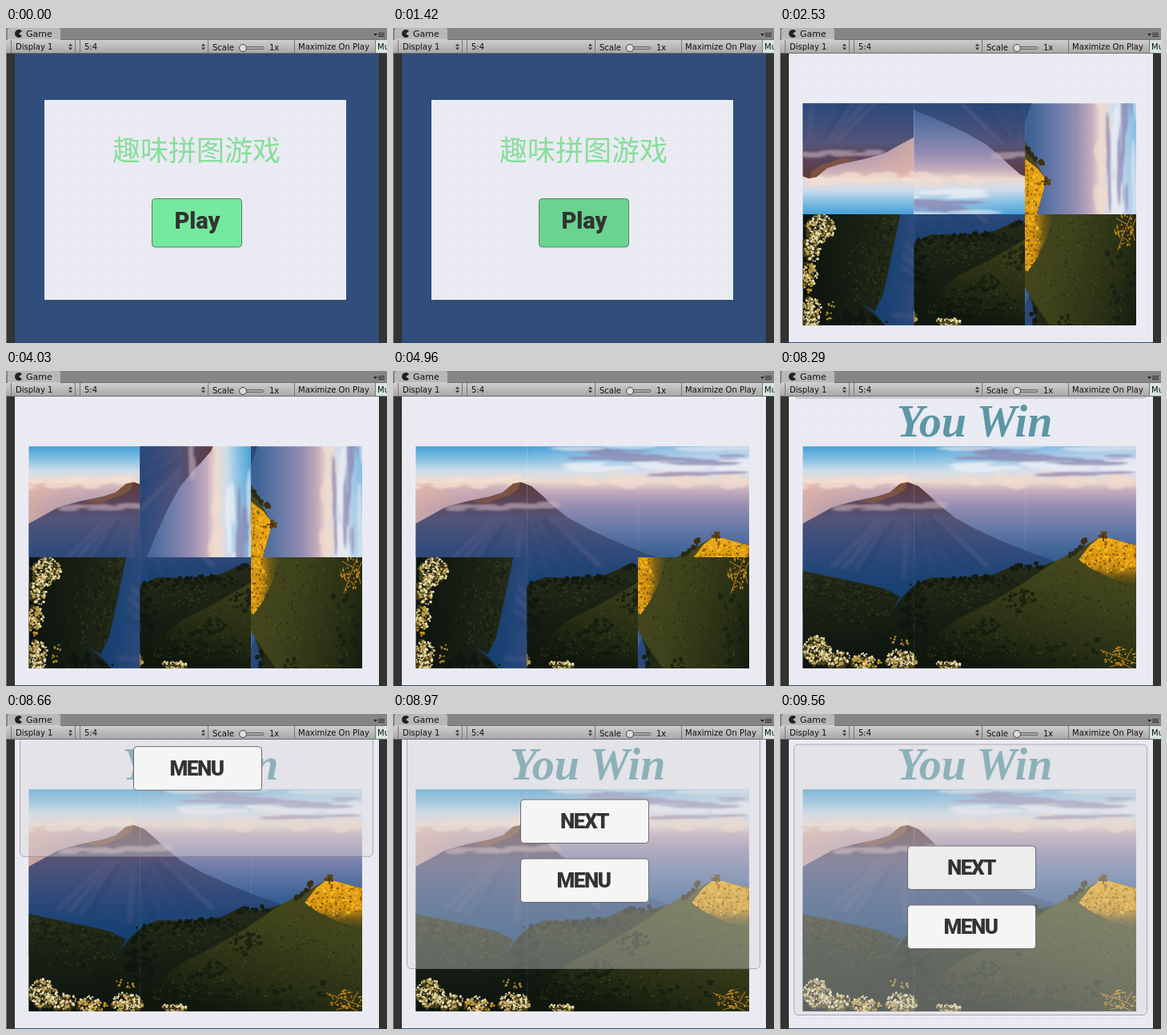
Recreate the animation shown at these times as an HTML page. Size 476 by 394 pixels, loop 9.89 s.

```html
<!DOCTYPE html>
<html lang="zh">
<head>
<meta charset="utf-8">
<title>Puzzle game</title>
<style>
html, body { margin: 0; width: 100%; height: 100%; overflow: hidden; background: #333; }
svg { display: block; width: 476px; height: 394px; }
.ui { font: 10px "DejaVu Sans", sans-serif; fill: #111; }
.label { font: 900 26px Roboto, sans-serif; letter-spacing: -1.5px; fill: #333; text-anchor: middle; }
</style>
</head>
<body>
<svg viewBox="0 0 476 394">
<defs>
  <linearGradient id="sky" x2="0" y2="1">
    <stop offset="0" stop-color="#469fd6"/><stop offset=".06" stop-color="#86c0e3"/>
    <stop offset=".11" stop-color="#cddcea"/><stop offset=".16" stop-color="#ecd9d0"/>
    <stop offset=".2" stop-color="#c5adbd"/><stop offset=".27" stop-color="#958db2"/>
    <stop offset=".36" stop-color="#6b7ba8"/><stop offset=".46" stop-color="#436699"/>
    <stop offset=".55" stop-color="#2a568c"/><stop offset="1" stop-color="#164470"/>
  </linearGradient>
  <linearGradient id="dusk">
    <stop offset="0" stop-color="#e6b5a2" stop-opacity=".75"/><stop offset="1" stop-color="#b99bb0" stop-opacity="0"/>
  </linearGradient>
  <linearGradient id="haze">
    <stop offset="0" stop-color="#dfe2f0" stop-opacity="0"/><stop offset="1" stop-color="#dfe2f0" stop-opacity=".7"/>
  </linearGradient>
  <linearGradient id="rock" x2="0" y2="1">
    <stop offset="0" stop-color="#5d3b38"/><stop offset=".14" stop-color="#5a4459"/>
    <stop offset=".28" stop-color="#545478"/><stop offset=".5" stop-color="#354c7c"/>
    <stop offset=".75" stop-color="#1c4375"/><stop offset="1" stop-color="#103a68"/>
  </linearGradient>
  <linearGradient id="grass" x1=".9" x2=".4" y2="1">
    <stop offset="0" stop-color="#4a4a1e"/><stop offset=".4" stop-color="#3d421b"/>
    <stop offset=".75" stop-color="#272e14"/><stop offset="1" stop-color="#10170d"/>
  </linearGradient>
  <linearGradient id="shade" x2="0" y2="1">
    <stop offset="0" stop-color="#272c18"/><stop offset=".45" stop-color="#182013"/><stop offset="1" stop-color="#0d130e"/>
  </linearGradient>
  <linearGradient id="sunlit" x2="0" y2="1">
    <stop offset="0" stop-color="#eaa514"/><stop offset=".6" stop-color="#d08f10"/><stop offset="1" stop-color="#7d5f12" stop-opacity="0"/>
  </linearGradient>
  <linearGradient id="bar" x2="0" y2="1">
    <stop offset="0" stop-color="#d0d0d0"/><stop offset="1" stop-color="#a6a6a6"/>
  </linearGradient>
  <pattern id="grid" width="20" height="20" patternUnits="userSpaceOnUse">
    <rect width="20" height="20" fill="#ececf4"/>
    <path d="M0 4.5H20M0 8.5H20M0 12.5H20M0 16.5H20M4.5 0V20M8.5 0V20M12.5 0V20M16.5 0V20" stroke="#e9e9f2"/>
    <path d="M0 .5H20M.5 0V20" stroke="#e5e5ee"/>
  </pattern>
  <filter id="soft" x="-20%" y="-50%" width="140%" height="200%"><feGaussianBlur stdDeviation="2.2 1.2"/></filter>
  <clipPath id="view"><rect x="11" y="32" width="455" height="361"/></clipPath>
  <clipPath id="frame"><rect x="28.5" y="94" width="416.5" height="278"/></clipPath>
  <clipPath id="ground"><path id="knoll" d="M373 236L386 219 398 209 412 209 445 218V268L415 260 390 248Z"/></clipPath>
  <g id="photo" clip-path="url(#frame)">
    <rect x="28" y="94" width="417" height="278" fill="url(#sky)"/>
    <rect x="28" y="140" width="170" height="58" fill="url(#dusk)"/>
    <rect x="170" y="94" width="275" height="36" fill="url(#haze)"/>
    <g id="clouds" filter="url(#soft)"></g>
    <path fill="url(#rock)" d="M28 191L50 179 66 170 92 163 121 157 137 152 150 141 160 139 173 144 188 157 198 167 218 183 245 198 280 214 310 226 350 240V300H28Z"/>
    <path fill="#95603f" opacity=".6" d="M97 163L121 157 137 152 150 141 159 139 156 148 146 155 131 160 118 165Z"/>
    <g id="ridges" filter="url(#soft)"></g>
    <path fill="url(#shade)" d="M28 250L62 257 105 266 130 272 150 282 140 300 120 372H28Z"/>
    <path fill="url(#shade)" d="M60 372L110 322 140 300 154 281 170 266 190 258 235 259 268 254 292 243 306 247 325 244 345 238V372Z"/>
    <path fill="url(#grass)" d="M150 372L185 338 222 310 262 290 300 268 338 242 357 231 379 220 398 209 412 209 445 218V372Z"/>
    <g id="texture"></g>
    <g clip-path="url(#ground)"><use href="#knoll" fill="url(#sunlit)"/><g id="gold"></g></g>
    <g id="plants"></g>
  </g>
</defs>

<rect width="476" height="394" fill="#333"/>
<path d="M.5 31V394" stroke="#777"/><path d="M10.5 32V394M466.5 32V394" stroke="#2a2a2a"/>
<rect x="11" y="32" width="455" height="362" fill="#304e79"/>

<g id="menu">
  <rect x="48" y="90" width="377" height="250" fill="url(#grid)"/>
  <text x="133" y="166" font-family="'Noto Sans CJK SC','Noto Sans CJK',sans-serif" font-size="35" font-weight="500" fill="#88de9a">趣味拼图游戏</text>
  <rect id="play" x="182.5" y="213.5" width="112" height="60.5" rx="4" stroke="#577f65"/>
  <text class="label" x="239" y="251" style="font-size:29px;letter-spacing:0">Play</text>
</g>

<g id="game" clip-path="url(#view)">
  <rect x="11" y="32" width="455" height="361" fill="url(#grid)"/>
  <g id="tiles"></g>
  <text id="win" x="243" y="82" text-anchor="middle" font-family="'Liberation Serif',serif" font-size="56" font-weight="700" font-style="italic" fill="#5c97a5">You Win</text>
  <g id="panel">
    <rect x="17.5" y="38" width="441" height="338.5" rx="5" fill="#d6d6d6" fill-opacity=".4" stroke="#77777f" stroke-opacity=".55"/>
    <rect id="next" x="159.5" y="165" width="160" height="54.5" rx="4" stroke="#6c6c6c"/>
    <text class="label" x="239" y="201">NEXT</text>
    <rect x="159.5" y="239" width="160" height="54.5" rx="4" fill="#f5f5f5" stroke="#6c6c6c"/>
    <text class="label" x="238" y="275">MENU</text>
  </g>
</g>

<g class="ui">
  <rect width="476" height="15" fill="#858585"/>
  <path d="M2 15V3Q2 0 5 0H65Q68 0 68 3V15Z" fill="#b8b8b8"/>
  <path d="M16 7L20 4A5 5 0 1 0 20 10Z" fill="#222"/>
  <text x="25" y="11" font-size="11">Game</text>
  <path d="M459 7H464L461.5 10Z" fill="#222"/><path d="M465 6.5H473M465 8.5H473M465 10.5H473" stroke="#333"/>
  <rect y="14" width="476" height="18" fill="url(#bar)"/>
  <path d="M0 14.5H2M68 14.5H476M0 31.5H476" stroke="#707070"/>
  <rect x="461" y="15" width="15" height="16" fill="#d5e5dc"/>
  <path d="M6.5 15V31M86.5 15V31M92.5 15V31M252.5 15V31M360.5 15V31M461.5 15V31" stroke="#777"/>
  <text x="12" y="27">Display 1</text><text x="98" y="27">5:4</text><text x="258" y="28">Scale</text>
  <text x="329" y="28">1x</text><text x="365" y="27">Maximize On Play</text><text x="464" y="27">Mute</text>
  <path fill="#333" d="M78 22.5H83L80.5 19.5ZM78 24.5H83L80.5 27.5ZM244 22.5H249L246.5 19.5ZM244 24.5H249L246.5 27.5Z"/>
  <rect x="293" y="23.5" width="29" height="3" rx="1.5" fill="#aaa" stroke="#666"/>
  <circle cx="296" cy="25" r="4.5" fill="#ddd" stroke="#444"/>
</g>
</svg>

<script>
const $ = id => document.getElementById(id);
const NS = 'http://www.w3.org/2000/svg';
const LOOP = 9890, TILE = 138.8, LEFT = 28.5, TOP = 94.2;

let seed = 7;
const rnd = (a = 0, b = 1) => {
  seed = (seed * 16807) % 2147483647;
  return a + (b - a) * seed / 2147483647;
};
function add(parent, tag, attrs) {
  const el = document.createElementNS(NS, tag);
  for (const k in attrs) el.setAttribute(k, attrs[k]);
  return parent.appendChild(el);
}
const blob = (x, y, rx, ry) =>
  `M${(x - rx).toFixed(1)} ${y.toFixed(1)}a${rx.toFixed(1)} ${ry.toFixed(1)} 0 1 0 ${(2 * rx).toFixed(1)} 0a${rx.toFixed(1)} ${ry.toFixed(1)} 0 1 0 ${(-2 * rx).toFixed(1)} 0`;

// n blobs in one path; place() gives each centre
function scatter(parent, n, fill, r0, r1, place, flat = 1, opacity = 1) {
  let d = '';
  for (let i = 0; i < n; i++) {
    const [x, y] = place(), r = rnd(r0, r1);
    d += blob(x, y, r, r * flat);
  }
  add(parent, 'path', { d, fill, opacity });
}
const inBox = (x0, y0, x1, y1) => () => [rnd(x0, x1), rnd(y0, y1)];
const inDisc = (cx, cy, rx, ry) => () => {
  const a = rnd(0, 6.283), q = Math.sqrt(rnd());
  return [cx + rx * q * Math.cos(a), cy + ry * q * Math.sin(a)];
};
const line = (x0, y0, x1, y1, spread) => () => {
  const u = rnd();
  return [x0 + (x1 - x0) * u, y0 + (y1 - y0) * u + rnd(-spread, spread)];
};
const onSlope = () => {
  const x = rnd(185, 445);
  const edge = 338 - 126 * Math.min(1, (x - 185) / 210);
  return [x, edge + 8 + rnd() * (350 - edge)];
};
const onLeftHill = () => {
  const x = rnd(28, 140), edge = 250 + (x - 28) * .22;
  return [x, edge + 3 + rnd() * rnd() * 60];
};

// gullies fan out from the summit
function gullies(parent, n, stroke) {
  let d = '';
  for (let i = 0; i < n; i++) {
    const u = rnd(-1, 1), r = rnd(.3, .6);
    const x = 160 + u * 110, y = 262 - 20 * Math.abs(u);
    d += `M${160 + (x - 160) * r} ${150 + (y - 150) * r}L${x} ${y}`;
  }
  add(parent, 'path', { d, stroke, 'stroke-width': 2.5, opacity: .3 });
}

function paintPhoto() {
  const clouds = $('clouds');
  scatter(clouds, 24, '#f3dfd0', 5, 13, line(28, 141, 165, 136, 5), .4, .75);
  scatter(clouds, 34, '#f2dccd', 4, 12, line(228, 134, 445, 138, 7), .45, .7);
  scatter(clouds, 14, '#eceef5', 14, 34, line(230, 120, 445, 118, 5), .12, .8);
  scatter(clouds, 26, '#8a80ab', 10, 30, line(222, 102, 425, 112, 7), .08, .7);
  scatter(clouds, 8, '#8d81a8', 16, 30, line(260, 130, 440, 128, 2), .06, .7);
  scatter(clouds, 8, '#dce5f1', 20, 40, line(200, 98, 440, 96, 3), .08, .7);

  const ridges = $('ridges');
  gullies(ridges, 16, '#223663');
  gullies(ridges, 10, '#6d6a8c');
  scatter(ridges, 26, '#c9b0b8', 6, 20, line(66, 173, 195, 167, 3), .15, .6);

  const tex = $('texture');
  scatter(tex, 160, '#3d4620', .6, 2, onLeftHill, .6, .5);
  scatter(tex, 90, '#10170e', 1, 3, onLeftHill, .6, .5);
  scatter(tex, 420, '#5d5f26', .4, 1.3, onSlope, .6, .5);
  scatter(tex, 380, '#1b2310', .5, 1.6, onSlope, .7, .5);
  scatter(tex, 120, '#3a411c', .6, 1.8, inBox(175, 268, 270, 300), .6, .6);
  scatter(tex, 70, '#11180f', 1.2, 2.8, line(160, 272, 300, 260, 7), .7, .8);
  scatter(tex, 40, '#141c10', 1.2, 2.8, inDisc(300, 287, 20, 14), .8, .8);
  scatter(tex, 24, '#151d11', 1.5, 3, inDisc(262, 318, 16, 9), .8, .8);
  scatter(tex, 90, '#10180f', 1.5, 4, inBox(110, 325, 300, 372), .7, .7);
  scatter(tex, 55, '#0e150e', 1.5, 4, inDisc(168, 304, 20, 30), .8, .8);
  scatter(tex, 24, '#141d11', 1.5, 4, inBox(310, 335, 400, 370), .8, .7);
  scatter(tex, 34, '#11190f', 1.2, 2.6, line(160, 268, 265, 257, 3));
  scatter(tex, 18, '#151c12', 1.2, 3, line(278, 246, 328, 243, 3));
  scatter(tex, 12, '#2b2a16', 1.2, 3, line(360, 231, 382, 217, 2));

  const gold = $('gold');
  scatter(gold, 200, '#fbbd25', .6, 2, inBox(374, 206, 446, 252), .7, .8);
  scatter(gold, 130, '#654509', .6, 1.7, inBox(376, 214, 446, 268), .8, .7);

  const plants = $('plants');
  scatter(plants, 10, '#5c4213', 1.2, 2.8, inDisc(404, 205, 6, 4));
  scatter(plants, 8, '#3b3015', 1.2, 2.6, inDisc(381, 212, 4, 3));
  add(plants, 'path', { d: 'M404 205V213M382 212L379 220', stroke: '#3a2c12', 'stroke-width': 1.5 });
  const clumps = [[46, 349, 18, 17], [72, 360, 16, 9], [104, 364, 15, 10], [151, 361, 20, 12], [210, 368, 15, 6]];
  for (const [x, y, rx, ry] of clumps) {
    const n = Math.round(rx * ry / 4);
    scatter(plants, n, '#4a431c', 1.2, 2.8, inDisc(x, y + 3, rx, ry));
    scatter(plants, n, '#b59a50', .8, 2.2, inDisc(x, y, rx, ry));
    scatter(plants, n, '#e9deb2', .5, 1.7, inDisc(x, y - 1, rx, ry));
    scatter(plants, n / 2, '#2c2c16', .5, 1.4, inDisc(x, y + 2, rx, ry));
  }
  scatter(plants, 18, '#c79520', .8, 2, inDisc(108, 366, 20, 8));
  scatter(plants, 14, '#a88728', .6, 1.6, inDisc(148, 338, 14, 6));
  scatter(plants, 60, '#c88a1c', .5, 1.7, inDisc(424, 357, 23, 12), .7);
  add(plants, 'path', {
    d: 'M445 366L420 356 400 349M432 361L440 347M416 355L411 363M425 358L423 348M440 372L428 366 412 370',
    fill: 'none', stroke: '#a9711a', 'stroke-width': 1.2
  });
}
paintPhoto();

// each click turns a tile a quarter back, the last one sets it upright
const clicks = [[2530, 2960, 3330], [4030, 4330], [4960], [5560], [], [6260, 6690, 7290]];
const tiles = clicks.map((times, i) => {
  const x = LEFT + i % 3 * TILE, y = TOP + Math.floor(i / 3) * TILE;
  const clip = add(document.querySelector('defs'), 'clipPath', { id: 'cell' + i });
  add(clip, 'rect', { x, y, width: TILE, height: TILE });
  const cell = add($('tiles'), 'g', { 'clip-path': `url(#cell${i})` });
  return { times, cx: x + TILE / 2, cy: y + TILE / 2, el: add(cell, 'use', { href: '#photo' }), angle: -1 };
});

const clamp = u => Math.max(0, Math.min(1, u));
const smooth = u => u * u * (3 - 2 * u);
const mix = (a, b, u) => `rgb(${a.map((v, i) => Math.round(v + (b[i] - v) * u))})`;
const show = (id, on) => $(id).setAttribute('display', on ? 'inline' : 'none');

function render(t) {
  show('menu', t < 1490);
  show('game', t >= 1490);
  show('win', t >= 7290);
  show('panel', t >= 8290);
  const press = t < 1350 ? 0 : t < 1420 ? .5 : 1;
  $('play').setAttribute('fill', mix([116, 234, 159], [104, 212, 143], press));
  for (const tile of tiles) {
    const angle = 90 * tile.times.filter(c => c > t).length;
    if (angle === tile.angle) continue;
    tile.angle = angle;
    tile.el.setAttribute('transform', `rotate(${angle} ${tile.cx} ${tile.cy})`);
  }
  const lift = -360 * (1 - smooth(clamp((t - 8144) / 1109)));
  $('panel').setAttribute('transform', `translate(0 ${lift.toFixed(2)})`);
  $('next').setAttribute('fill', mix([245, 245, 245], [237, 237, 237], clamp((t - 9390) / 170)));
}

const start = performance.now();
function tick() {
  render((performance.now() - start) % LOOP);
  requestAnimationFrame(tick);
}
tick();
</script>
</body>
</html>
```
